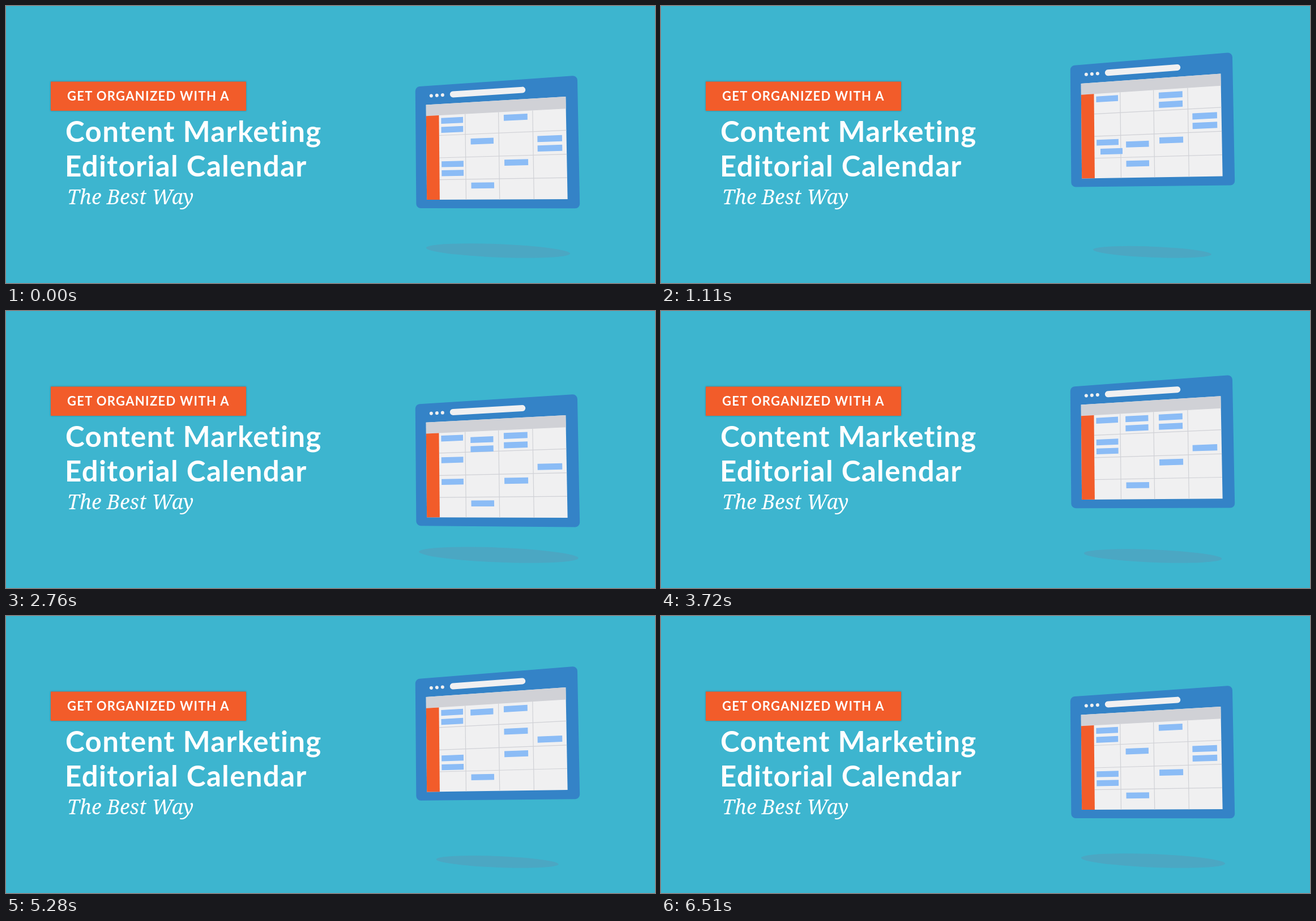
These frames come from a looping animation (1146 px wide and 489 px high, 6.54 s). An HTML page with a canvas:

```html
<!DOCTYPE html>
<html lang="en">
<head>
<meta charset="utf-8">
<title>Editorial Calendar</title>
<style>
  html, body { margin: 0; width: 100%; height: 100%; overflow: hidden; background: #3db5cf; }
  canvas, svg { position: absolute; left: 0; top: 0; display: block; }
  text { fill: #fff; }
  .tag { font: 700 22px Lato, sans-serif; letter-spacing: 1.32px; }
  .title { font: 700 51px Lato, sans-serif; letter-spacing: 1.35px; }
  .sub { font: italic 500 35.5px "Noto Serif", serif; }
  .banner { fill: #f25c2a; filter: drop-shadow(0 0 1.5px rgba(0, 0, 0, .3)); }
</style>
</head>
<body>
<canvas id="stage" width="1146" height="489"></canvas>
<svg width="1146" height="489">
  <rect class="banner" x="79" y="133.5" width="345" height="51.5"/>
  <text class="tag" x="108" y="167">GET ORGANIZED WITH A</text>
  <text class="title" x="105" y="240">Content Marketing</text>
  <text class="title" x="104" y="301">Editorial Calendar</text>
  <text class="sub" x="108" y="349.5">The Best Way</text>
</svg>
<script>
const ctx = document.getElementById('stage').getContext('2d');
const LOOP = 6540, STEP = 30;
const RISE = 420, SETTLE = 210;
const BG = '#3db5cf', PAPER = '#f0f0f1', RULE = '#d0d1d6', ORANGE = '#f25c2a';

// Vertical float of the window: [time, offset]
const FLOAT = [[0, 0], [1260, -42.5], [2880, 25.2], [4620, -48.5], [6450, 0], [LOOP, 0]];

// Page grid: column edges and row edges
const COLS = [764.3, 810.5, 869.3, 929.5, 988.3];
const ROWS = [.118, .328, .562, .791, 1];

// Bars in order of arrival: column letter, row, slot in the cell
const START = 'c10 b40 c30 d21 a30 a31 a10 a11 b20 d20';

// Time, cell left, cell reached, bars taken (latest arrivals go first)
const MOVES = [
  [30, 'a1', 'c1', 1], [690, 'b2', 'b3', 1], [1020, 'a3', 'b3', 1], [1770, 'd2', 'a2', 1],
  [2430, 'b3', 'b1', 2], [3060, 'a3', 'a2', 1], [3720, 'b1', 'a1', 1], [4260, 'c1', 'c2', 1],
  [4790, 'a2', 'a3', 2], [5220, 'b1', 'b2', 1], [5850, 'c2', 'd2', 1]
];

let lift = 0;

const lerp = (a, b, p) => a + (b - a) * p;
const ease = p => {
  p = Math.min(1, Math.max(0, p));
  return p * p * (3 - 2 * p);
};

function floatAt(t) {
  const i = FLOAT.findIndex(k => k[0] > t);
  const [t0, y0] = FLOAT[i - 1], [t1, y1] = FLOAT[i];
  return lerp(y0, y1, ease((t - t0) / (t1 - t0)));
}

const stop = (at, cell, slot) => ({
  at,
  col: cell.charCodeAt(0) - 97,
  v: .177 + (cell[1] - 1) * .2265 + slot * .094
});

// A moving bar takes the first free slot of the cell it reaches
function planBars() {
  let bars = START.split(' ').map(s => {
    const cell = s.slice(0, 2), slot = +s[2];
    return { cell, slot, path: [stop(0, cell, slot)] };
  });
  for (const [at, from, to, count] of MOVES) {
    const taken = bars.filter(b => b.cell === from).slice(-count);
    for (const bar of taken) {
      bar.slot = bars.some(b => b.cell === to && b.slot === 0) ? 1 : 0;
      bar.cell = to;
      bar.path.push(stop(at, to, bar.slot));
    }
    bars = bars.filter(b => !taken.includes(b)).concat(taken);
  }
  return bars;
}

// Window plane to stage: u is x along the top of the page, v runs down it
function project(u, v) {
  const top = 174.5 - (u - 741.5) * .0588;
  const bottom = 342 - (u - 741.5) * .004;
  const near = (u - 723) / 286;
  return [u + v * (1.3 + 2.2 * near), lerp(top, bottom, v) + lift * (.915 + .085 * near)];
}

const corners = (u0, v0, u1, v1) =>
  [[u0, v0], [u1, v0], [u1, v1], [u0, v1]].map(p => project(...p));

function quad(u0, v0, u1, v1, color) {
  ctx.fillStyle = color;
  ctx.beginPath();
  corners(u0, v0, u1, v1).forEach(p => ctx.lineTo(...p));
  ctx.fill();
}

function line(u0, v0, u1, v1, color, width) {
  ctx.strokeStyle = color;
  ctx.lineWidth = width;
  ctx.beginPath();
  ctx.moveTo(...project(u0, v0));
  ctx.lineTo(...project(u1, v1));
  ctx.stroke();
}

function roundedQuad(u0, v0, u1, v1, radius, color) {
  const c = corners(u0, v0, u1, v1);
  ctx.fillStyle = color;
  ctx.beginPath();
  ctx.moveTo((c[0][0] + c[1][0]) / 2, (c[0][1] + c[1][1]) / 2);
  for (let i = 1; i <= 4; i++) ctx.arcTo(...c[i % 4], ...c[(i + 1) % 4], radius);
  ctx.fill();
}

// Glide a little past the goal, then settle back
function glide(from, to, over, t) {
  const peak = to + Math.sign(to - from) * over;
  return t < RISE ? lerp(from, peak, ease(t / RISE)) : lerp(peak, to, ease((t - RISE) / SETTLE));
}

function drawBar({ path }, t) {
  let [from] = path, { col, v } = from;
  for (const to of path.slice(1)) {
    if (t < to.at) break;
    col = glide(from.col, to.col, .09, t - to.at);
    v = glide(from.v, to.v, .029, t - to.at);
    from = to;
  }
  const i = Math.min(2, Math.max(0, Math.floor(col)));
  const mid = k => (COLS[k] + COLS[k + 1]) / 2;
  const u = lerp(mid(i), mid(i + 1), col - i);
  const half = 19.3 + .8 * col;
  quad(u - half, v - .0305, u + half, v + .0305, '#8bbcf6');
}

function drawShadow() {
  const a = 127.3 + lift * .56;
  ctx.fillStyle = '#4ba7c3';
  ctx.beginPath();
  ctx.ellipse(869 + lift * .04, 444.7 - a * .1, a, a * .092, .04, 0, Math.PI * 2);
  ctx.fill();
}

function drawWindow() {
  roundedQuad(723, -.198, 1009.5, 1.09, 8, '#3483c7');

  ctx.lineCap = 'round';
  for (const u of [751, 761, 771]) line(u, -.0925, u + .01, -.0925, PAPER, 6);
  line(789.5, -.0925, 912, -.0925, PAPER, 11);
  ctx.lineCap = 'butt';

  const left = 741.7, right = COLS[4];
  quad(left, 0, right, 1, PAPER);
  quad(left, 0, right, ROWS[0], RULE);
  for (const u of COLS.slice(1, 4)) line(u, ROWS[0], u, 1, RULE, 1.2);
  for (const v of ROWS.slice(1, 4)) line(COLS[0], v, right, v, RULE, 1.2);
  quad(left, ROWS[0], COLS[0], 1, ORANGE);
}

const bars = planBars();

function draw(t) {
  lift = floatAt(t);
  ctx.fillStyle = BG;
  ctx.fillRect(0, 0, 1146, 489);
  drawShadow();
  drawWindow();
  bars.forEach(bar => drawBar(bar, t));
}

const begin = performance.now();
function tick() {
  const t = (performance.now() - begin) % LOOP;
  draw(Math.floor(t / STEP) * STEP);
  requestAnimationFrame(tick);
}
tick();
</script>
</body>
</html>
```
